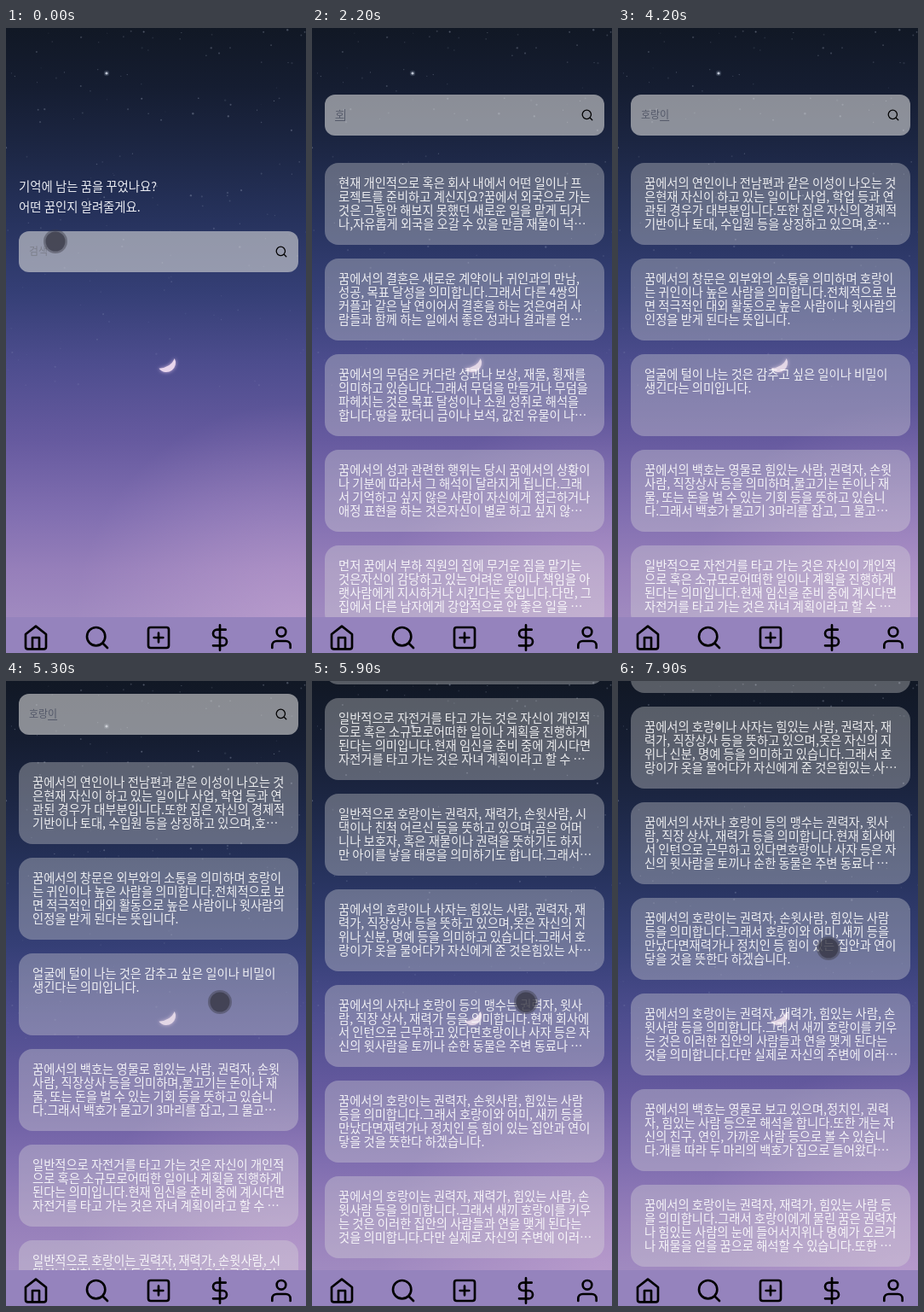
An HTML page with a canvas that plays this animation: 352 px wide and 732 px high, repeating every 8000 ms.

```html
<!DOCTYPE html>
<html lang="ko">
<head>
<meta charset="utf-8">
<title>꿈 해몽 검색</title>
<style>
html, body { margin: 0; width: 100%; height: 100%; overflow: hidden; background: #141a2a; }
canvas { display: block; width: 352px; height: 732px; }
</style>
</head>
<body>
<canvas id="stage"></canvas>
<script>
const W = 352, H = 732, LOOP = 8000, STEP = 100;
const NAV_Y = 690, LIST_Y = 158, CARD_H = 96, PITCH = 112;
const FONT = '"Noto Sans CJK KR", "Noto Sans CJK", sans-serif';
const dpr = window.devicePixelRatio || 1;

const lists = {
  single: [
    '현재 개인적으로 혹은 회사 내에서 어떤 일이나 프|로젝트를 준비하고 계신지요?꿈에서 외국으로 가는|것은 그동안 해보지 못했던 새로운 일을 맡게 되거|나,자유롭게 외국을 오갈 수 있을 만큼 재물이 넉⋯',
    '꿈에서의 결혼은 새로운 계약이나 귀인과의 만남,|성공, 목표 달성을 의미합니다.그래서 다른 4쌍의|커플과 같은 날 연이어서 결혼을 하는 것은여러 사|람들과 함께 하는 일에서 좋은 성과나 결과를 얻⋯',
    '꿈에서의 무덤은 커다란 성과나 보상, 재물, 횡재를|의미하고 있습니다.그래서 무덤을 만들거나 무덤을|파헤치는 것은 목표 달성이나 소원 성취로 해석을|합니다.땅을 팠더니 금이나 보석, 값진 유물이 나⋯',
    '꿈에서의 성과 관련한 행위는 당시 꿈에서의 상황이|나 기분에 따라서 그 해석이 달라지게 됩니다.그래|서 기억하고 싶지 않은 사람이 자신에게 접근하거나|애정 표현을 하는 것은자신이 별로 하고 싶지 않⋯',
    '먼저 꿈에서 부하 직원의 집에 무거운 짐을 맡기는|것은자신이 감당하고 있는 어려운 일이나 책임을 아|랫사람에게 지시하거나 시킨다는 뜻입니다.다만, 그|집에서 다른 남자에게 강압적으로 안 좋은 일을 ⋯'
  ],
  partial: [
    '꿈에서 산을 오르거나 좁은 골짜기를 지나는 것은자|신이 원하는 목표나 성과를 위해 노력을 기울인다는|의미입니다.그리고 자신과 함께 가는 사람은 자신의|친구나 동료로 볼 수 있으며,다른 길로 가고 있던 ⋯',
    '칼에 베이는 꿈은 뭔가 하는 일에 문제가 생길 수 있|으니 주의하라는 의미일 수 있습니다. 다만 청소년|기나 청년기에는 별다른 의미가 없이도 이런 꿈을|흔히 꿀 수 있고요.',
    '이러한 꿈처럼 여러 사람이나 상징이 나오고 상황이|나 장면이 계속 바뀌는 꿈은 크게 의미가 없는 꿈이|라고 보시면 됩니다.',
    '까마귀가 나오는 꿈은 뭔가 구설수를 의미하는 것일|수 있습니다. 이런 꿈을 꿨다면 동생이나 거기에 등|장한 언니 분이나 뭔가 다른 사람의 입에 오르내리|지 않도록 주의를 하는 것이 좋겠지요. 다만 꿈의 ⋯',
    '여러 상징이 한꺼번에 나오는 꿈의 경우에는 오히려|별 의미가 없다고 보시면 됩니다. 다만 님의 꿈의 경|우 기차 여행을 하는 중에 이 동물들이 나왔다면 뭔|가 새로 시작하여 진행하는 일에서 성과가 생긴다⋯'
  ],
  full: [
    '꿈에서의 연인이나 전남편과 같은 이성이 나오는 것|은현재 자신이 하고 있는 일이나 사업, 학업 등과 연|관된 경우가 대부분입니다.또한 집은 자신의 경제적|기반이나 토대, 수입원 등을 상징하고 있으며,호⋯',
    '꿈에서의 창문은 외부와의 소통을 의미하며 호랑이|는 귀인이나 높은 사람을 의미합니다.전체적으로 보|면 적극적인 대외 활동으로 높은 사람이나 윗사람의|인정을 받게 된다는 뜻입니다.',
    '얼굴에 털이 나는 것은 감추고 싶은 일이나 비밀이|생긴다는 의미입니다.',
    '꿈에서의 백호는 영물로 힘있는 사람, 권력자, 손윗|사람, 직장상사 등을 의미하며,물고기는 돈이나 재|물, 또는 돈을 벌 수 있는 기회 등을 뜻하고 있습니|다.그래서 백호가 물고기 3마리를 잡고, 그 물고⋯',
    '일반적으로 자전거를 타고 가는 것은 자신이 개인적|으로 혹은 소규모로어떠한 일이나 계획을 진행하게|된다는 의미입니다.현재 임신을 준비 중에 계시다면|자전거를 타고 가는 것은 자녀 계획이라고 할 수 ⋯',
    '일반적으로 호랑이는 권력자, 재력가, 손윗사람, 시|댁이나 친척 어르신 등을 뜻하고 있으며,곰은 어머|니나 보호자, 혹은 재물이나 권력을 뜻하기도 하지|만 아이를 낳을 태몽을 의미하기도 합니다.그래서⋯',
    '꿈에서의 호랑이나 사자는 힘있는 사람, 권력자, 재|력가, 직장상사 등을 뜻하고 있으며,옷은 자신의 지|위나 신분, 명예 등을 의미하고 있습니다.그래서 호|랑이가 옷을 물어다가 자신에게 준 것은힘있는 사⋯',
    '꿈에서의 사자나 호랑이 등의 맹수는 권력자, 윗사|람, 직장 상사, 재력가 등을 의미합니다.현재 회사에|서 인턴으로 근무하고 있다면호랑이나 사자 등은 자|신의 윗사람을 토끼나 순한 동물은 주변 동료나 ⋯',
    '꿈에서의 호랑이는 권력자, 손윗사람, 힘있는 사람|등을 의미합니다.그래서 호랑이와 어미, 새끼 등을|만났다면재력가나 정치인 등 힘이 있는 집안과 연이|닿을 것을 뜻한다 하겠습니다.',
    '꿈에서의 호랑이는 권력자, 재력가, 힘있는 사람, 손|윗사람 등을 의미합니다.그래서 새끼 호랑이를 키우|는 것은 이러한 집안의 사람들과 연을 맺게 된다는|것을 의미합니다.다만 실제로 자신의 주변에 이러⋯',
    '꿈에서의 백호는 영물로 보고 있으며,정치인, 권력|자, 힘있는 사람 등으로 해석을 합니다.또한 개는 자|신의 친구, 연인, 가까운 사람 등으로 볼 수 있습니|다.개를 따라 두 마리의 백호가 집으로 들어왔다⋯',
    '꿈에서의 호랑이는 권력자, 재력가, 힘있는 사람 등|을 의미합니다.그래서 호랑이에게 물린 꿈은 권력자|나 힘있는 사람의 눈에 들어서지위나 명예가 오르거|나 재물을 얻을 꿈으로 해석할 수 있습니다.또한 ⋯'
  ]
};

// Stepped tracks: [start, value]
const typing = [[0, ''], [1800, 'ㅎ'], [2000, '호'], [2500, '호라'], [2750, '호랑'], [3350, '호랑이']];
const results = [[0, null], [1800, 'single'], [2900, 'partial'], [3700, 'full']];
// Interpolated tracks: [time, ...values]
const scrolling = [[5100, 0], [5300, 63], [5500, 250], [5700, 450], [5900, 586], [6250, 700], [6600, 774], [7900, 800]];
const pointer = [[4500, 330, 460], [5000, 251, 376], [5900, 251, 376], [6600, 260, 355], [7900, 247, 313]];

const icons = {
  home: 'M3 9l9-7 9 7v11a2 2 0 0 1-2 2H5a2 2 0 0 1-2-2zM9 22V12h6v10',
  search: 'M19 11a8 8 0 1 1-16 0 8 8 0 0 1 16 0M21 21l-4.35-4.35',
  add: 'M5 3h14a2 2 0 0 1 2 2v14a2 2 0 0 1-2 2H5a2 2 0 0 1-2-2V5a2 2 0 0 1 2-2zM12 8v8M8 12h8',
  dollar: 'M12 1v22M17 5H9.5a3.5 3.5 0 0 0 0 7h5a3.5 3.5 0 0 1 0 7H6',
  user: 'M20 21v-2a4 4 0 0 0-4-4H8a4 4 0 0 0-4 4v2M16 7a4 4 0 1 1-8 0 4 4 0 0 1 8 0'
};
for (const name in icons) icons[name] = new Path2D(icons[name]);

function prepare(canvas) {
  canvas.width = Math.round(W * dpr);
  canvas.height = Math.round(H * dpr);
  const c = canvas.getContext('2d');
  c.scale(dpr, dpr);
  return c;
}

function stepAt(track, t) {
  return track.filter(k => k[0] <= t).pop();
}

function tween(track, t) {
  if (t <= track[0][0]) return track[0].slice(1);
  for (let i = 1; i < track.length; i++) {
    const a = track[i - 1], b = track[i];
    if (t <= b[0]) {
      const p = (t - a[0]) / (b[0] - a[0]);
      return a.slice(1).map((v, j) => v + (b[j + 1] - v) * p);
    }
  }
  return track[track.length - 1].slice(1);
}

function drawSky(c) {
  const sky = c.createLinearGradient(0, 0, 0, NAV_Y);
  [[0, '#111825'], [.1, '#151d31'], [.2, '#1c2643'], [.32, '#26325c'], [.45, '#353f76'],
   [.57, '#4d4d8e'], [.7, '#665a9f'], [.82, '#806eb0'], [.92, '#967fba'], [1, '#a08ac0']]
    .forEach(s => sky.addColorStop(...s));
  c.fillStyle = sky;
  c.fillRect(0, 0, W, H);

  const glow = c.createRadialGradient(340, 700, 0, 340, 700, 260);
  glow.addColorStop(0, 'rgba(205,170,215,.5)');
  glow.addColorStop(1, 'rgba(205,170,215,0)');
  c.fillStyle = glow;
  c.fillRect(0, 0, W, H);

  let seed = 41;
  const rand = () => (seed = seed * 16807 % 2147483647) / 2147483647;
  for (let i = 0; i < 170; i++) {
    const x = rand() * W, y = Math.pow(rand(), 1.2) * 430;
    const alpha = (.08 + rand() * .3) * (1 - y / 600);
    disc(c, x, y, .5 + rand() * .7, `rgba(205,215,235,${alpha})`);
  }
  disc(c, 118, 53, 3.2, 'rgba(190,205,230,.18)');
  disc(c, 118, 53, 1.6, 'rgba(225,232,245,.8)');

  c.save();
  c.shadowColor = 'rgba(235,205,240,.8)';
  c.shadowBlur = 4 * dpr;
  c.fillStyle = '#e8d5ec';
  c.beginPath();
  c.arc(188, 392, 11, 2.48, -.46, true);
  c.quadraticCurveTo(193.5, 398, 179.3, 398.8);
  c.fill();
  c.restore();
}

function disc(c, x, y, r, color) {
  c.fillStyle = color;
  c.beginPath();
  c.arc(x, y, r, 0, Math.PI * 2);
  c.fill();
}

const ctx = prepare(document.getElementById('stage'));
const sky = document.createElement('canvas');
drawSky(prepare(sky));

function panel(y, h, r, color) {
  ctx.fillStyle = color;
  ctx.beginPath();
  ctx.roundRect(15, y, 328, h, r);
  ctx.fill();
}

function icon(name, x, y, size) {
  ctx.save();
  ctx.translate(x - size / 2, y - size / 2);
  ctx.scale(size / 24, size / 24);
  ctx.lineWidth = 2;
  ctx.lineCap = ctx.lineJoin = 'round';
  ctx.strokeStyle = '#000';
  ctx.stroke(icons[name]);
  ctx.restore();
}

function text(str, x, y, size, color) {
  ctx.font = `${size}px ${FONT}`;
  ctx.fillStyle = color;
  ctx.fillText(str, x, y);
}

function drawSearch(y, t) {
  const [since, query] = stepAt(typing, t);
  const base = y + 28;
  panel(y, 48, 12, 'rgba(217,217,217,.6)');
  icon('search', 323, y + 24, 15.5);
  text(query || '검색', 27, base, 12, query ? '#555a6a' : '#7c7f8b');

  const end = query ? 27 + ctx.measureText(query).width : 27;
  ctx.fillStyle = '#555a6a';
  if (query) {
    const last = ctx.measureText(query.slice(-1)).width;
    ctx.fillRect(end - last, base + 2, last, 1);
  }
  const focus = Math.max(since, 100);
  if (t >= focus && Math.floor((t - focus) / 500) % 2 === 0) ctx.fillRect(Math.round(end), y + 17, 1, 14);
}

function drawCards(cards, scroll) {
  cards.forEach((card, i) => {
    const y = LIST_Y + i * PITCH - scroll;
    if (y > NAV_Y || y < -CARD_H) return;
    panel(y, CARD_H, 16, 'rgba(217,217,217,.35)');
    card.split('|').forEach((line, n) => text(line, 31, y + 29 + n * 16, 14.3, 'rgba(255,255,255,.88)'));
  });
}

function drawNav() {
  ctx.fillStyle = '#9583bd';
  ctx.fillRect(0, NAV_Y, W, H - NAV_Y);
  ['home', 'search', 'add', 'dollar', 'user'].forEach((name, i) => icon(name, 35 + i * 72, 714, 32));
}

function drawPointer(t) {
  let pos;
  if (t < 1500) pos = [58, 250];
  else if (t >= 4500) pos = tween(pointer, t);
  else return;
  disc(ctx, ...pos, 14, 'rgba(60,60,72,.45)');
  disc(ctx, ...pos, 11.5, 'rgba(52,52,66,.65)');
}

function draw(t) {
  ctx.drawImage(sky, 0, 0, W, H);
  const set = stepAt(results, t)[1];
  if (set) {
    const scroll = Math.round(tween(scrolling, t)[0]);
    drawSearch(78 - scroll, t);
    drawCards(lists[set], scroll);
  } else {
    text('기억에 남는 꿈을 꾸었나요?', 15, 190.5, 14.4, '#eceef4');
    text('어떤 꿈인지 알려줄게요.', 15, 214.5, 14.4, '#eceef4');
    drawSearch(238, t);
  }
  drawNav();
  drawPointer(t);
}

const start = performance.now();
function frame() {
  const t = (performance.now() - start) % LOOP;
  draw(Math.floor(t / STEP) * STEP);
  requestAnimationFrame(frame);
}
frame();
</script>
</body>
</html>
```
